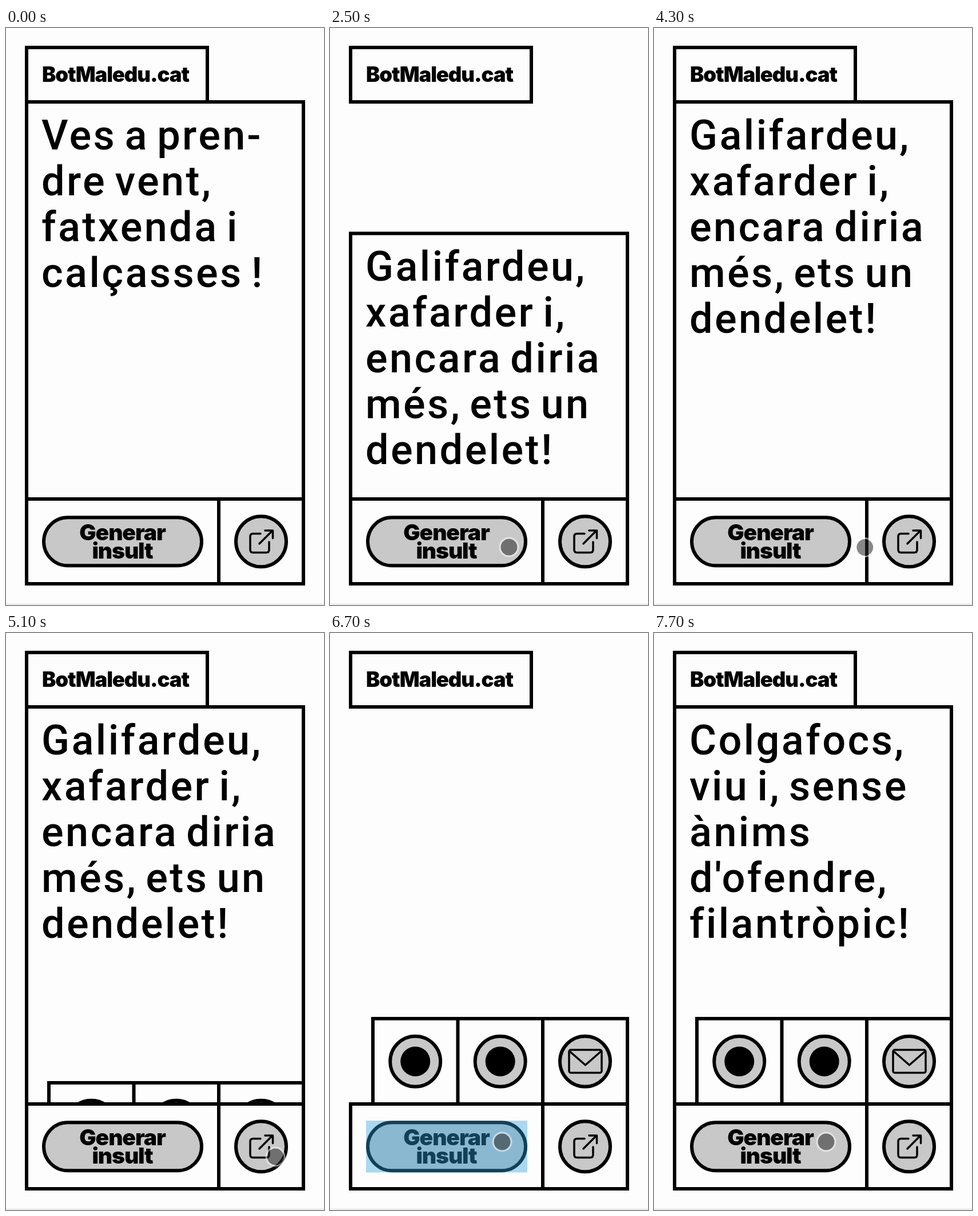
These frames come from a looping animation (556 px wide and 1007 px high, 8000 ms). An HTML page:

```html
<!DOCTYPE html>
<html lang="ca">
<head>
<meta charset="utf-8">
<style>
  html, body { margin: 0; width: 100%; height: 100%; overflow: hidden; background: #fdfdfd; }
  svg { display: block; width: 556px; height: 1007px; }
  .insult { font: 450 72px Roboto, "Liberation Sans", sans-serif; letter-spacing: 3.4px; word-spacing: -7px; }
  .brand { font: 900 36.5px Inter, Roboto, sans-serif; letter-spacing: -1.1px; }
  .label { font: 900 39px Inter, Roboto, sans-serif; letter-spacing: -1.1px; text-anchor: middle; }
  .box { fill: #fdfdfd; stroke: #000; stroke-width: 6; }
  .key { fill: #c8c8c8; stroke: #000; stroke-width: 6; }
  .icon { fill: none; stroke: #000; stroke-width: 3.5; stroke-linecap: round; stroke-linejoin: round; }
  .tap { fill: rgba(45, 160, 220, .4); }
</style>
</head>
<body>
<svg viewBox="0 0 556 1007">
  <clipPath id="stage"><path d="M0 0H556V822H0Z"/></clipPath>
  <path fill="#eee" d="M0 1004H556V1007H0Z"/>
  <path class="box" d="M36 34H352V129H36Z"/>
  <text class="brand" x="63" y="94">BotMaledu.cat</text>

  <g clip-path="url(#stage)">
    <g id="panel">
      <path class="box" d="M36 129H520V840H36Z"/>
      <g id="lines" class="insult"></g>
    </g>
    <g id="share">
      <path class="box" d="M75 673H520V840H75ZM223.500 673V840M372 673V840"/>
      <circle class="key" cx="149.200" cy="747.700" r="44"/>
      <circle cx="149.200" cy="747.700" r="26"/>
      <circle class="key" cx="297.700" cy="747.700" r="44"/>
      <circle cx="297.700" cy="747.700" r="26"/>
      <circle class="key" cx="446" cy="747.700" r="44"/>
      <rect class="icon" x="418" y="727.500" width="57" height="40" rx="3"/>
      <path class="icon" d="M419 730L446.500 754L474 730"/>
    </g>
  </g>

  <path class="box" d="M36 822H520V970H36ZM372 822V970"/>
  <rect class="key" x="66" y="854.300" width="276" height="84" rx="42"/>
  <text class="label" x="203.500" y="894">Generar</text>
  <text class="label" x="203.500" y="926">insult</text>
  <circle class="key" cx="446" cy="896.300" r="44"/>
  <path class="icon" d="M445 882.500H432q-5 0-5 5v23q0 5 5 5h23q5 0 5-5V897M443 900L466 877M453 877H466.500V890.500"/>

  <path id="tapMain" class="tap" d="M63 851H345V941.500H63Z"/>
  <path id="tapShare" class="tap" d="M399 849H493V943H399Z"/>
  <g id="cursor">
    <circle r="14.500" fill="rgba(40,40,40,.55)"/>
    <circle r="16" fill="none" stroke="rgba(255,255,255,.5)" stroke-width="3"/>
  </g>
</svg>
<script>
const LOOP = 8000, STEP = 100;
const $ = id => document.getElementById(id);

const insults = [
  ["Ves a pren-", "dre vent,", "fatxenda i", "calçasses !"],
  ["Galifardeu,", "xafarder i,", "encara diria", "més, ets un", "dendelet!"],
  ["Colgafocs,", "viu i, sense", "ànims", "d'ofendre,", "filantròpic!"]
];
const TAPS = [1800, 6700], SHARE_TAP = 4900;
const SLIDE_DELAY = 330, SLIDE = 600;

// time, x, y
const path = [
  [0, 450, 1040], [300, 405, 985], [600, 350, 935], [900, 320, 910], [1100, 313, 906],
  [4100, 313, 906], [4250, 345, 905], [4450, 440, 911], [4600, 471, 914],
  [5400, 471, 914], [5500, 452, 930], [5600, 410, 934], [5700, 315, 903],
  [5800, 281, 880], [5900, 276, 877], [6000, 276, 877], [6300, 301, 888]
];

function cursorAt(t) {
  const i = path.findIndex(p => p[0] > t);
  if (i < 0) return path[path.length - 1].slice(1);
  const [t0, x0, y0] = path[i - 1], [t1, x1, y1] = path[i];
  const k = (t - t0) / (t1 - t0);
  return [x0 + (x1 - x0) * k, y0 + (y1 - y0) * k];
}

function ease(t, start) {
  const k = Math.min(1, Math.max(0, (t - start) / SLIDE));
  return k * k * (3 - 2 * k);
}

function tapFade(t, start) {
  return t < start ? 0 : Math.min(1, Math.max(0, (start + 200 - t) / 100));
}

let shown = -1;
function showInsult(n) {
  if (n === shown) return;
  shown = n;
  $("lines").innerHTML = insults[n]
    .map((line, i) => `<text x="62" y="${212 + 80 * i}">${line}</text>`).join("");
}

function shift(id, x, y) {
  $(id).setAttribute("transform", `translate(${x} ${y})`);
}

function draw(t) {
  const n = TAPS.filter(tap => t >= tap).length;
  showInsult(n);
  shift("panel", 0, n ? 699 * (1 - ease(t, TAPS[n - 1] + SLIDE_DELAY)) : 0);
  shift("share", 0, 153 * (1 - ease(t, SHARE_TAP - 4)));
  $("tapMain").style.opacity = Math.max(...TAPS.map(tap => tapFade(t, tap)));
  $("tapShare").style.opacity = tapFade(t, SHARE_TAP);
  shift("cursor", ...cursorAt(t));
}

const begin = performance.now();
function frame() {
  const t = (performance.now() - begin) % LOOP;
  draw(Math.floor(t / STEP) * STEP);
  requestAnimationFrame(frame);
}
frame();
</script>
</body>
</html>
```
